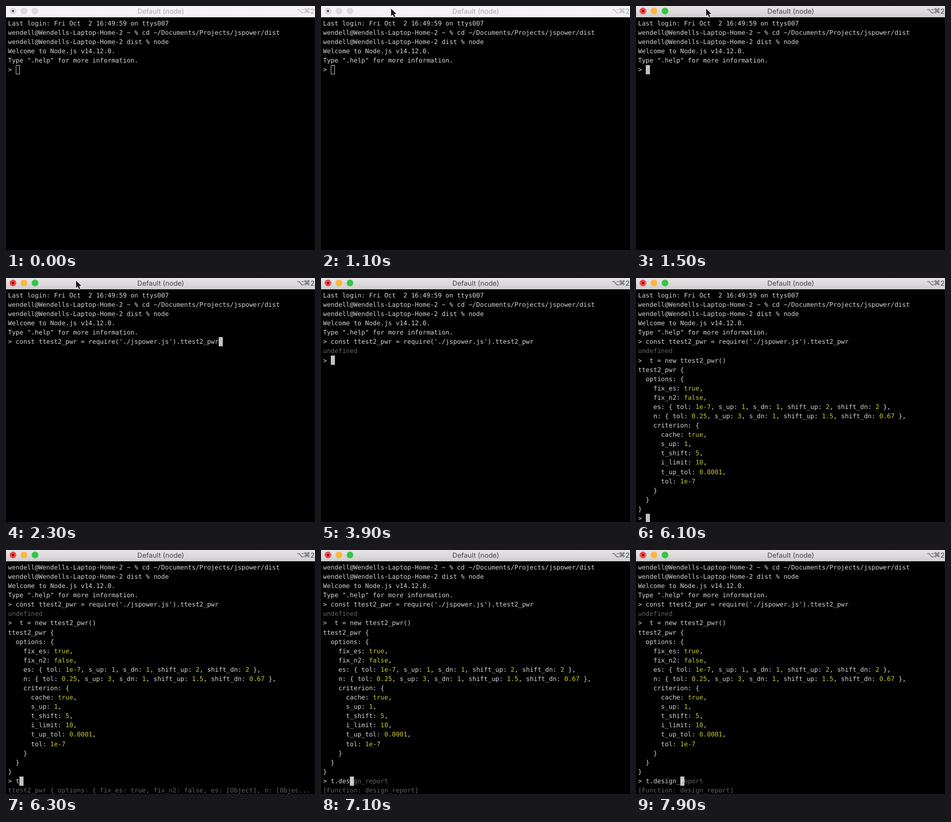
Recreate the animation shown at these times as an HTML page with a canvas. Size 600 by 475 pixels, loop 8000 ms.

```html
<!DOCTYPE html>
<html lang="en">
<head>
<meta charset="utf-8">
<title>Terminal session</title>
<style>
  html, body { margin: 0; height: 100%; overflow: hidden; background: #000; }
  canvas { display: block; width: 600px; height: 475px; }
</style>
</head>
<body>
<canvas id="stage"></canvas>
<script>
const LOOP = 8000, STEP = 200;
const ROWS = 25, LEFT = 4, TOP = 24.9, CELL = 7.436, LINE = 18.08;
const WHITE = '#d4d4d4', GRAY = '#636363', YELLOW = '#c9c932', BLOCK = '#c2c2c2';
const MONO = '12.35px "DejaVu Sans Mono", monospace';

// Times of the session events, in ms
const POINTER_IN = 500, HOVER = 700, FOCUS = 1500, PASTE_REQUIRE = 1900, RUN_REQUIRE = 2700,
      PASTE_NEW = 5500, RUN_NEW = 5900, TYPE = 6300;

const HOST = 'wendell@Wendells-Laptop-Home-2';
const INTRO = [
  'Last login: Fri Oct  2 16:49:59 on ttys007',
  HOST + ' ~ % cd ~/Documents/Projects/jspower/dist',
  HOST + ' dist % node',
  'Welcome to Node.js v14.12.0.',
  'Type ".help" for more information.'
];
const REQUIRE = "const ttest2_pwr = require('./jspower.js').ttest2_pwr";
const CREATE = ' t = new ttest2_pwr()';
const REPORT = `ttest2_pwr {
  options: {
    fix_es: true,
    fix_n2: false,
    es: { tol: 1e-7, s_up: 1, s_dn: 1, shift_up: 2, shift_dn: 2 },
    n: { tol: 0.25, s_up: 3, s_dn: 1, shift_up: 1.5, shift_dn: 0.67 },
    criterion: {
      cache: true,
      s_up: 1,
      t_shift: 5,
      i_limit: 10,
      t_up_tol: 0.0001,
      tol: 1e-7
    }
  }
}`.split('\n');
const SUMMARY = 'ttest2_pwr { options: { fix_es: true, fix_n2: false, es: [Object], n: [Object], criterion: [Object] } }'
  .slice(0, 76) + '...';
const CALL = 't.design_report';
const VALUE = /((?<=: )(?:true|false|\d[\d.e-]*))/;
const POINTER_PATH = [[40, 45], [60, 11], [108, 1], [136, 5]];

const canvas = document.getElementById('stage');
const ctx = canvas.getContext('2d');
const scale = window.devicePixelRatio || 1;
canvas.width = 600 * scale;
canvas.height = 475 * scale;
ctx.scale(scale, scale);
ctx.textRendering = 'geometricPrecision';

function label(text, x, y, font, color, align = 'left') {
  ctx.font = font;
  ctx.fillStyle = color;
  ctx.textAlign = align;
  ctx.fillText(text, x, y);
}

function cells(text, col, row, color) {
  label(text, LEFT + col * CELL, TOP + row * LINE + 13.1, MONO, color);
}

// What the terminal holds at time t
function session(t) {
  const lines = [...INTRO];
  let input = '', ghost = '', preview = '', scroll = 0;
  if (t >= PASTE_REQUIRE) input = REQUIRE;
  if (t >= RUN_REQUIRE) {
    lines.push('> ' + REQUIRE, 'undefined');
    input = '';
  }
  if (t >= PASTE_NEW) {
    input = CREATE;
    preview = SUMMARY;
  }
  if (t >= RUN_NEW) {
    lines.push('> ' + CREATE, ...REPORT);
    input = preview = '';
  }
  if (t >= TYPE) {
    const typed = 1 + Math.floor((t - TYPE) / STEP);
    input = CALL.slice(0, typed);
    if (typed === 1) preview = SUMMARY;
    if (typed > 2) {
      ghost = CALL.slice(typed);
      preview = '[Function: design_report]';
    }
    scroll = lines.length + 2 - ROWS;
  }
  return { lines, input, ghost, preview, scroll };
}

function drawTerminal(t) {
  const { lines, input, ghost, preview, scroll } = session(t);
  lines.slice(scroll).forEach((line, row) => {
    if (line === 'undefined') return cells(line, 0, row, GRAY);
    let col = 0;
    line.split(VALUE).forEach((part, i) => {
      cells(part, col, row, i % 2 ? YELLOW : WHITE);
      col += part.length;
    });
  });

  const row = lines.length - scroll, col = input.length + 2;
  cells('> ' + input, 0, row, WHITE);
  cells(preview, 0, row + 1, GRAY);
  const x = Math.round(LEFT + col * CELL), y = Math.round(TOP + row * LINE);
  if (t < FOCUS) {
    ctx.strokeStyle = BLOCK;
    ctx.lineWidth = 1;
    ctx.strokeRect(x + .5, y + .5, 7, 17);
  } else {
    ctx.fillStyle = BLOCK;
    ctx.fillRect(x, y, 8, 18);
  }
  cells(ghost.slice(0, 1), col, row, '#f2f2f2');
  cells(ghost.slice(1), col + 1, row, GRAY);
}

function drawTitleBar(t) {
  const active = t >= FOCUS;
  const lit = active || (t >= HOVER && t < HOVER + STEP);
  const bar = ctx.createLinearGradient(0, 0, 0, 22);
  bar.addColorStop(0, active ? '#e6e4e6' : '#f6f2f6');
  bar.addColorStop(1, active ? '#d0ced0' : '#f4f0f4');
  ctx.fillStyle = bar;
  ctx.fillRect(0, 0, 600, 22);

  ['#fb4648', '#f8b83c', '#30c945'].forEach((color, i) => {
    disc(13.5 + 21.4 * i, 6.5, lit ? color : '#dcd8dc');
  });
  disc(13.5, 2.2, lit ? '#4a0508' : '#4c4a4c');

  const ink = active ? '#464446' : '#aaa7aa';
  label('Default (node)', 300.5, 15, '13.4px Inter, sans-serif', ink, 'center');
  label('⌥', 572, 14, '13px "DejaVu Sans", sans-serif', ink, 'center');
  label('⌘', 584.5, 14, '13px "DejaVu Sans", sans-serif', ink, 'center');
  label('2', 595, 14.5, '13.4px Inter, sans-serif', ink, 'center');
}

function disc(x, r, color) {
  ctx.fillStyle = color;
  ctx.beginPath();
  ctx.arc(x, 9.7, r, 0, 2 * Math.PI);
  ctx.fill();
}

const arrow = new Path2D('M0 0V14.5L3.4 11.4L5.8 17L8.4 15.9L6 10.5H10.6Z');

function drawPointer(t) {
  if (t < POINTER_IN || t >= RUN_REQUIRE) return;
  const step = Math.min(Math.floor((t - POINTER_IN) / STEP), POINTER_PATH.length - 1);
  ctx.save();
  ctx.translate(...POINTER_PATH[step]);
  ctx.strokeStyle = '#fff';
  ctx.lineWidth = 1.8;
  ctx.stroke(arrow);
  ctx.fillStyle = '#1c1a1c';
  ctx.fill(arrow);
  ctx.restore();
}

function draw() {
  const t = performance.now() % LOOP;
  ctx.fillStyle = '#000';
  ctx.fillRect(0, 0, 600, 475);
  drawTerminal(t);
  drawTitleBar(t);
  drawPointer(t);
  requestAnimationFrame(draw);
}
draw();
</script>
</body>
</html>
```
